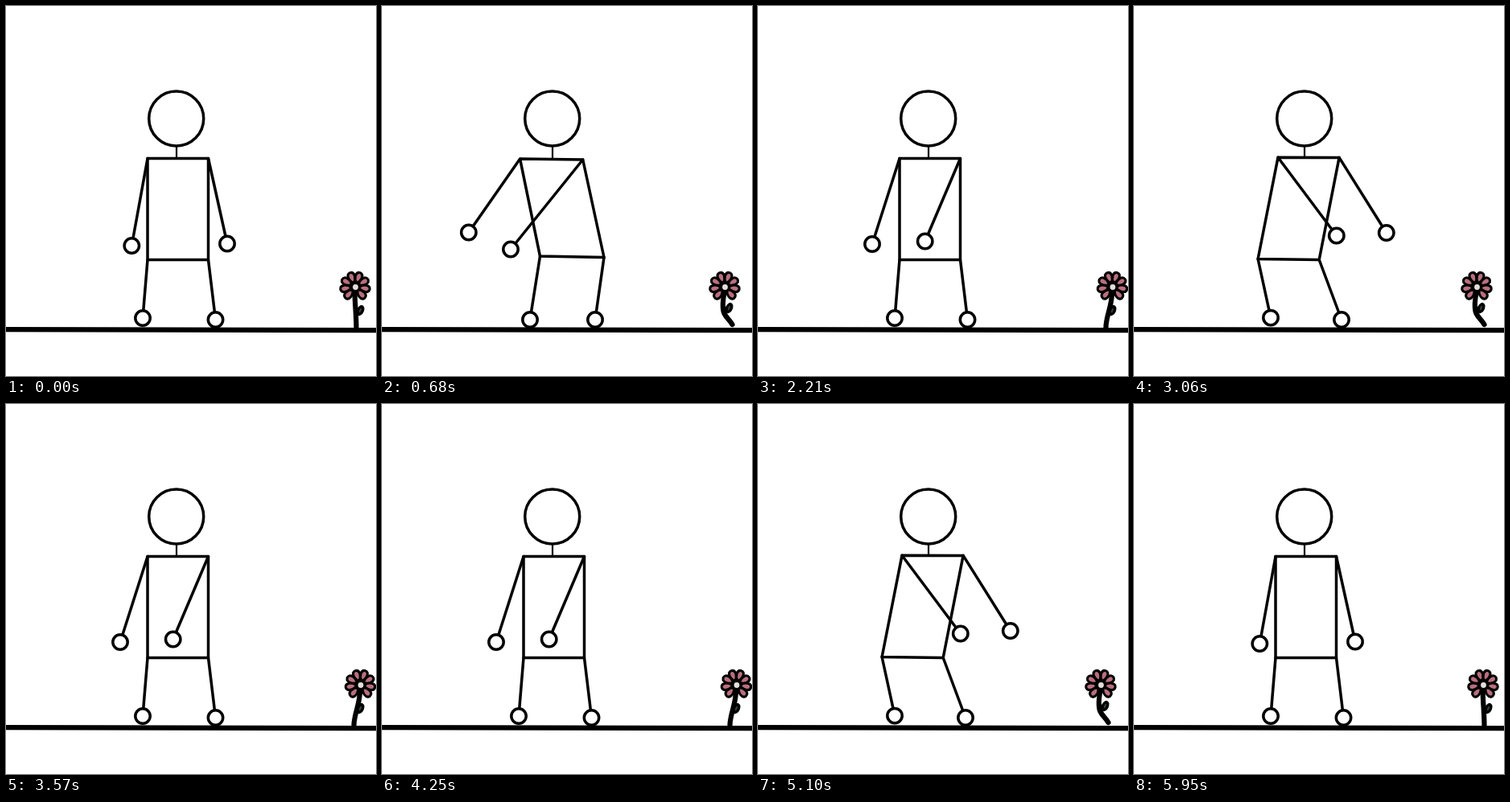
These frames come from a looping animation (460 by 460 pixels, 6.12 s). An HTML page:

```html
<!DOCTYPE html>
<html lang="en">
<head>
<meta charset="utf-8">
<title>Dancing stick figure</title>
<style>
  html, body { margin: 0; width: 100%; height: 100%; overflow: hidden; background: #fff; }
  svg { display: block; width: 100vw; height: 100vh; filter: blur(.35px); }
  .ink { fill: none; stroke: #000; stroke-width: 3.5; stroke-linecap: round; stroke-linejoin: round; }
  .ball { fill: #fff; stroke: #000; stroke-width: 3.5; }
  .petal { fill: #b96f7e; stroke: #000; stroke-width: 3; stroke-linejoin: round; }
  .stem { fill: none; stroke: #000; stroke-width: 6.2; stroke-linecap: round; }
</style>
</head>
<body>
<svg viewBox="0 0 460 460">
  <circle class="ink" cx="211.7" cy="140" r="34"/>
  <path d="M212 174V189" stroke="#000" stroke-width="2.2"/>
  <g id="dancer"></g>
  <path d="M0 402.2L460 403.2" stroke="#000" stroke-width="6.2"/>
</svg>
<script>
const STEP = 170, COUNT = 36;

// sway moves the hips, lean tips the flower
const poses = {
  rest:  { sway: 0, lean: 0, hands: [[156.3, 298], [275, 295.5]] },
  cross: { sway: 0, lean: 1, hands: [[142, 296], [207.7, 292.5]] },
  left:  { sway: 1, lean: -1, hands: [[107.8, 281.5], [160, 302.5]] },
  right: { sway: -1, lean: -1, hands: [[251.8, 285.5], [313.8, 282]] }
};
const cycle = ['left', 'cross', 'right', 'rest'];

const limb = ([x, y], [ex, ey]) =>
  `<path class="ink" d="M${x} ${y}L${ex} ${ey}"/><circle class="ball" cx="${ex}" cy="${ey}" r="9.2"/>`;

function figure({ sway, hands }) {
  const stretch = Math.abs(sway);
  const at = (base, swing, spread) => base + swing * sway + spread * stretch;
  const shoulders = [
    [at(176, -3.7, -.7), at(189.5, .9, -.3)],
    [at(251.5, -2.7, .9), at(189.5, 1.3, .2)]
  ];
  const hips = [
    [at(176, 21.2, -.7), at(315.5, -1.7, -2.7)],
    [at(251.5, 22.9, 1.6), at(315.5, -1.5, -1.5)]
  ];
  const feet = [
    [at(170, 7, 7), at(388, 1.2, .8)],
    [at(260.5, 3.5, 1), 390]
  ];
  const torso = [...shoulders, hips[1], hips[0]].join('L');
  return `<path class="ink" d="M${torso}Z"/>`
    + hips.map((hip, i) => limb(hip, feet[i])).join('')
    + shoulders.map((shoulder, i) => limb(shoulder, hands[i])).join('');
}

function flower({ lean }) {
  const droop = Math.max(0, -lean);
  const x = 434 + 6.5 * lean - 1.5 * droop, y = 349;
  const root = 435.5 - 3 * Math.max(0, lean);
  const stem = `M${x - .5} ${y + 7}C${x - 6 * droop} ${372 + 16 * droop} `
    + `${root - 6.5 * droop} ${386 - 2 * droop} ${root} ${400 - 4 * droop}`;
  const leaf = `translate(${440.5 - 9 * droop} ${378.5 - 3 * droop}) rotate(25)`;
  // nine even slots, the lowest one taken by the stem
  let petals = '';
  for (let angle = -20; angle <= 300; angle += 40) {
    if (angle !== 180)
      petals += `<path class="petal" transform="rotate(${angle})" d="M0-5C-5-9-6-18 0-18.5C6-18 5-9 0-5Z"/>`;
  }
  return `<g transform="translate(${x} ${y})">${petals}<circle r="5.5"/></g>
    <path class="stem" d="${stem}"/>
    <g transform="${leaf}"><ellipse rx="4.5" ry="7"/><ellipse rx="1.2" ry="3" fill="#33403d"/></g>
    <circle cx="${x + .5}" cy="${y + .5}" r="3.4" fill="#e4dedb"/>`;
}

const dancer = document.getElementById('dancer');
const drawings = {};
for (const name of cycle) drawings[name] = figure(poses[name]) + flower(poses[name]);

let shown;
function draw(time) {
  const step = Math.floor(time / STEP) % COUNT;
  // the dance opens from rest, then repeats its four poses
  const name = step ? cycle[step % cycle.length] : 'rest';
  if (name !== shown) dancer.innerHTML = drawings[shown = name];
}

const start = performance.now();
function tick() {
  draw(performance.now() - start);
  requestAnimationFrame(tick);
}
tick();
</script>
</body>
</html>
```
